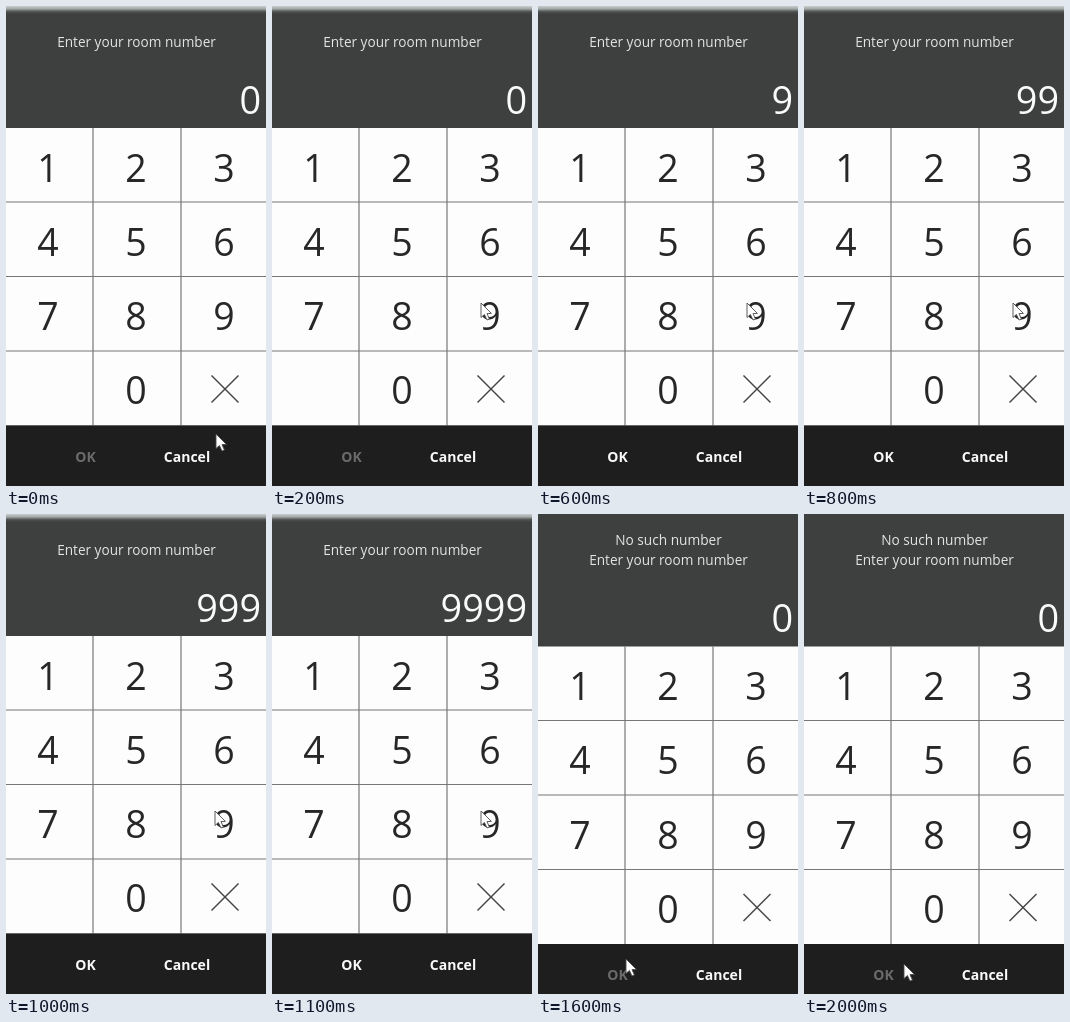
An HTML page with a canvas that plays this animation: 260x480 px, repeating every 2.1 s.

```html
<!DOCTYPE html>
<html lang="en">
<head>
<meta charset="utf-8">
<title>Room number keypad</title>
<style>
  html, body { margin: 0; width: 100%; height: 100%; overflow: hidden; background: #1e1e1e; }
  canvas { display: block; width: 260px; height: 480px; }
</style>
</head>
<body>
<canvas id="stage" width="260" height="480"></canvas>
<script>
const ctx = document.getElementById('stage').getContext('2d');
const W = 260, H = 480, LOOP = 2100;
const FONT = '"Open Sans", "Noto Sans", sans-serif';
const OLIVE = '#babd5c';
const COLS = [42, 130, 218];
const ROWS = [122, 196, 270.5, 345, 419.5];

// Each entry: start time in ms, then the properties that change there.
const steps = [
  [0, { x: 210, y: 428, value: '0', ok: false, press: '', error: false }],
  [100, { x: 218, y: 372 }],
  [200, { x: 209, y: 297 }],
  [400, { press: '9' }],
  [600, { press: '', value: '9', ok: true }],
  [700, { press: '9' }],
  [800, { press: '', value: '99' }],
  [900, { press: '9' }],
  [1000, { press: '', value: '999' }],
  [1100, { value: '9999' }],
  [1200, { x: 166, y: 372 }],
  [1300, { x: 90, y: 441 }],
  [1400, { x: 87, y: 443, press: 'OK' }],
  [1600, { x: 88, y: 445, press: '', value: '0', ok: false, error: true }],
  [1700, { x: 91, y: 448 }],
  [2000, { x: 100, y: 450 }]
];

function stateAt(t) {
  return Object.assign({}, ...steps.filter(s => s[0] <= t).map(s => s[1]));
}

function rect(x, y, w, h, color) {
  ctx.fillStyle = color;
  ctx.fillRect(x, y, w, h);
}

function text(str, x, y, size, color, weight = 400, align = 'center') {
  ctx.font = `${weight} ${size}px ${FONT}`;
  ctx.textAlign = align;
  ctx.fillStyle = color;
  ctx.fillText(str, x, y);
}

function line(x1, y1, x2, y2, color, width) {
  ctx.strokeStyle = color;
  ctx.lineWidth = width;
  ctx.beginPath();
  ctx.moveTo(x1, y1);
  ctx.lineTo(x2, y2);
  ctx.stroke();
}

function drawHeader(s, shift) {
  rect(0, 0, W, 140, '#3e403f');
  if (s.error) {
    text('No such number', 130.5, 31, 13.7, '#e4e4e4');
  } else {
    const edge = ctx.createLinearGradient(0, 0, 0, 8);
    edge.addColorStop(0, '#c9cecd');
    edge.addColorStop(0.35, '#a3aaa9');
    edge.addColorStop(0.7, '#505453');
    edge.addColorStop(1, '#3e403f');
    rect(0, 0, W, 8, edge);
  }
  text('Enter your room number', 130.5, 41 + shift, 13.6, '#e4e4e4');
  text(s.value, 255, 108 + shift, 37.8, '#fafafa', 400, 'right');
}

function drawKeys(s) {
  rect(0, ROWS[0], W, ROWS[4] - ROWS[0], '#fdfdfd');
  if (s.press === '9') rect(175, ROWS[2], 85, ROWS[3] - ROWS[2], OLIVE);
  for (const y of ROWS.slice(1, 4)) line(0, y, W, y, '#777', 1.2);
  for (const x of [87, 175]) line(x, ROWS[0], x, ROWS[4], '#777', 1.2);
  for (let n = 1; n <= 10; n++) {
    const col = n === 10 ? 1 : (n - 1) % 3;
    const row = Math.floor((n - 1) / 3);
    text(String(n % 10), COLS[col], 175.5 + row * 74.3, 37.5, '#272727');
  }
  line(205.5, 369.5, 232.5, 396.5, '#444', 1.5);
  line(232.5, 369.5, 205.5, 396.5, '#444', 1.5);
}

function drawBar(s) {
  rect(0, ROWS[4], W, 70, '#1e1e1e');
  if (s.press === 'OK') rect(35, 420, 88, 60, OLIVE);
  const okColor = s.press === 'OK' ? '#f3f3d8' : s.ok ? '#fafafa' : '#6b6b6b';
  text('OK', 79.5, 455.5, 14, okColor, 700);
  text('Cancel', 181, 455.5, 14, '#fafafa', 700);
}

function drawCursor(x, y) {
  const arrow = [[0, 0], [0, 14.5], [3.4, 11.5], [6, 17], [8.4, 16], [6, 10.6], [10.4, 10.4]];
  ctx.beginPath();
  for (const [dx, dy] of arrow) ctx.lineTo(x + dx, y + dy);
  ctx.closePath();
  ctx.fillStyle = '#fff';
  ctx.fill();
  ctx.strokeStyle = '#4a4a4a';
  ctx.lineWidth = 0.9;
  ctx.stroke();
}

function draw(t) {
  const s = stateAt(t);
  const shift = s.error ? 10 : 0;
  drawHeader(s, shift);
  ctx.save();
  ctx.translate(0, s.error ? 10.5 : 0);
  drawKeys(s);
  drawBar(s);
  ctx.restore();
  drawCursor(s.x, s.y);
}

const start = performance.now();
function frame() {
  draw((performance.now() - start) % LOOP);
  requestAnimationFrame(frame);
}
frame();
</script>
</body>
</html>
```
